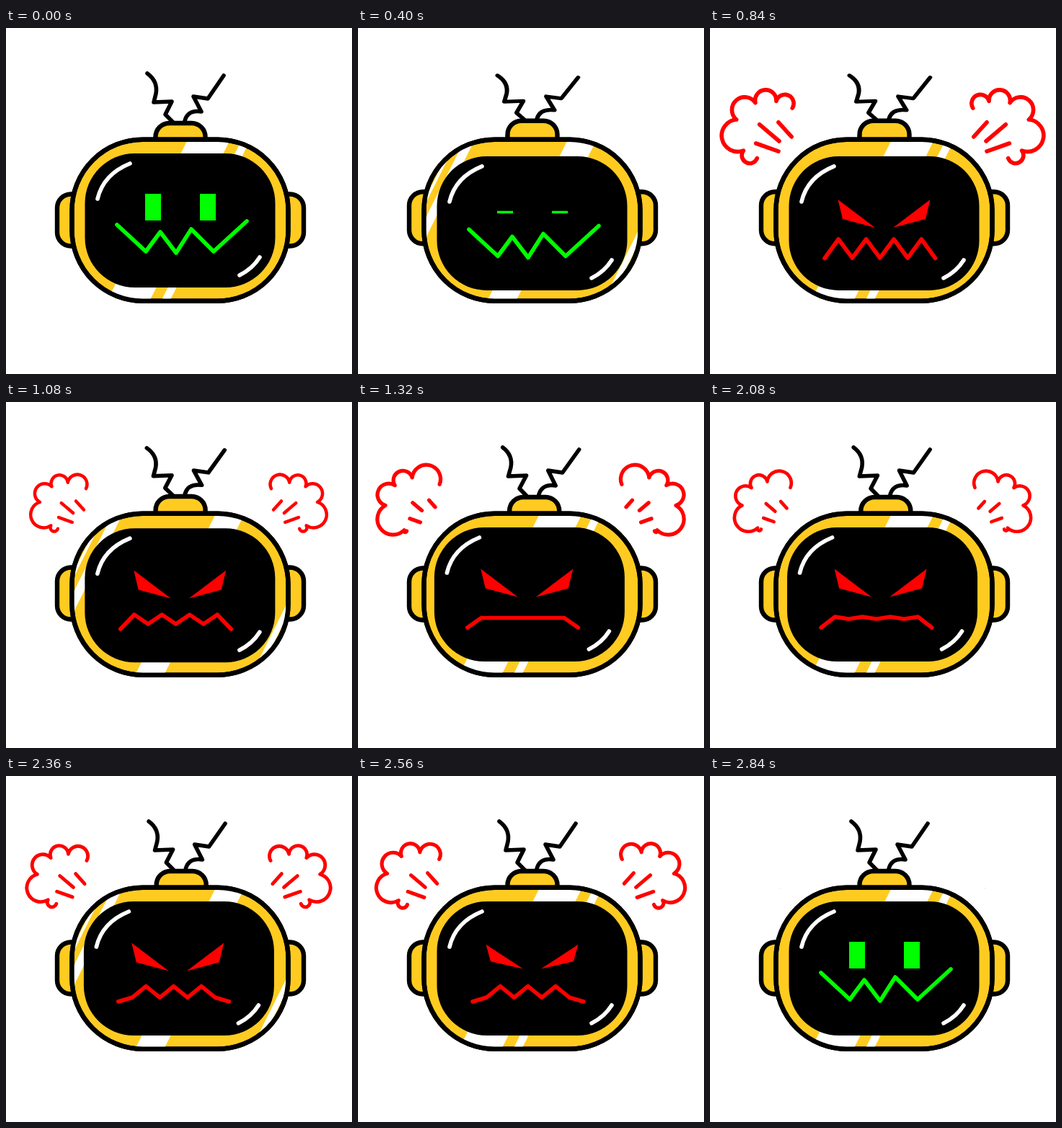
Recreate the animation shown at these times as an HTML page. Size 480 by 480 pixels, loop 2.88 s.

```html
<!DOCTYPE html>
<html lang="en">
<head>
<meta charset="utf-8">
<title>Angry robot</title>
<style>
html, body { margin: 0; width: 100%; height: 100%; overflow: hidden; background: #fff; }
svg { display: block; width: 100%; height: 100%; }
.body { fill: #ffcb21; stroke: #000; stroke-width: 6.4; }
.line { fill: none; stroke-width: 5.6; stroke-linecap: round; stroke-linejoin: round; }
</style>
</head>
<body>
<svg viewBox="0 0 480 480">
  <defs>
    <rect id="head" x="91.500" y="154.700" width="300" height="224" rx="98"/>
    <clipPath id="ring"><use href="#head"/></clipPath>
    <path id="eye" d="M177.500 231.500L229 270.500L184 258.500Z"/>
    <g id="cloud" class="line" stroke="#f00">
      <path id="outline"/>
      <path id="streaks"/>
    </g>
  </defs>
  <g id="puffL"><use href="#cloud"/></g>
  <g id="puffR"><use href="#cloud"/></g>
  <g id="ears" class="body">
    <rect x="71" y="230.500" width="50" height="72" rx="19"/>
    <rect x="363" y="230.500" width="50" height="72" rx="19"/>
  </g>
  <rect id="bump" class="body" x="207.500" y="132" width="69" height="44" rx="19"/>
  <g id="antenna" class="line" stroke="#000">
    <path d="M196 63Q211 74 208 91L205 103L230 102L221 120L231 130"/>
    <path d="M302 66L280 98L260 95L271 116Q252 113 248 129"/>
  </g>
  <use href="#head" class="body"/>
  <path id="glint" fill="#fff" clip-path="url(#ring)"/>
  <use href="#head" class="body" style="fill: none"/>
  <g id="screen">
    <rect x="109.500" y="174" width="264" height="186" rx="69"/>
    <path class="line" stroke="#fff" d="M127 237Q135 203 172 188M324 343Q342 334 352 318"/>
  </g>
  <g id="face">
    <g id="calm">
      <path class="eyes" fill="#0f0" d="M193 230h22v37h-22zM269 230h22v37h-22z"/>
      <path class="line" stroke="#0f0" d="M154 273L194 310L214 283L236 312L257 279L288 310L334 268"/>
    </g>
    <g id="angry">
      <g class="eyes" fill="#f00">
        <use href="#eye"/>
        <use href="#eye" transform="translate(483 0) scale(-1 1)"/>
      </g>
      <path id="growl" class="line" stroke="#f00"/>
    </g>
  </g>
</svg>
<script>
const LOOP = 2880, STEP = 40;
const GLINT_HOLD = 2840 / 14;
const TAU = 2 * Math.PI;
const $ = id => document.getElementById(id);
const set = (id, name, value) => $(id).setAttribute(name, value);
const mix = (a, b, p) => a + (b - a) * p;
const clamp = p => Math.min(1, Math.max(0, p));
const span = (t, a, b) => clamp((t - a) / (b - a));
const smooth = p => (1 - Math.cos(Math.PI * p)) / 2;
const ramp = (t, a, b) => smooth(span(t, a, b));
const backOut = (p, c) => 1 + (c + 1) * (p - 1) ** 3 + c * (p - 1) ** 2;
const blink = (t, mid) => smooth(clamp(1 - Math.abs(t - mid) / 120));

// Nod while angry starts, then shake the head.
const nod = t => 6.5 * (ramp(t, 0, 360) - ramp(t, 880, 1200));
const shake = t => t > 1075 && t < 2425 ? -7.3 * Math.cos(TAU * (t - 1300) / 900) : 0;

// Height of the mouth's teeth; below zero they point the other way.
const teeth = t => 13 * (1 - ramp(t, 840, 1320) + ramp(t, 1320, 1760) - 1.6 * ramp(t, 1760, 2360));

// Clouds pop out, breathe and shrink away.
const puff = t => backOut(span(t, 560, 960), 3)
  * (.86 + .08 * Math.cos(TAU * (t - 700) / 600))
  * (1 - span(t, 2540, 2843) ** 1.6);

function growlPath(a) {
  const points = Array.from({ length: 9 }, (_, i) => {
    const end = i % 8 === 0;
    return `${159 + 19.2 * i} ${end ? 313 : 299.5 + (i % 2 ? -a : a)}`;
  });
  return "M" + points.join("L");
}

// Round puffs between joints on an ellipse; the joints roll along it.
function cloudPath(roll) {
  const joints = [48, 78, 113, 159, 223, 250].map((deg, i) => {
    const turn = -Math.min(250, i % 5 ? deg + roll : deg) * TAU / 360;
    return [82 + 48 * Math.cos(turn), 142 + 41 * Math.sin(turn)];
  });
  return joints.map(([x, y], i) => {
    if (!i) return `M${x} ${y}`;
    const r = .505 * Math.hypot(x - joints[i - 1][0], y - joints[i - 1][1]);
    return `A${r} ${r} 0 1 0 ${x} ${y}`;
  }).join("");
}

function streakPath(from, to) {
  return [[95, 131, 18, 20], [69, 134, 27, 23], [64, 160, 31, 11]].map(([x, y, dx, dy]) =>
    `M${x + dx * from} ${y + dy * from}L${x + dx * to} ${y + dy * to}`).join("");
}

// Slanted bands, given as left edge and width at y = 165.
const glints = [
  [[247, 59], [322, 12]],
  [[129, 4], [143, 14], [286, 40], [447, 9]]
].map(bands => bands.map(([x, w]) => `M${x + 10} 145h${w}l-125 250h${-w}Z`).join(""));

function draw(t) {
  const x = shake(t), y = nod(t);
  set("face", "transform", `translate(${x} ${y})`);
  set("screen", "transform", `translate(${x * .5} ${y * .6})`);

  // Parts behind the head move the opposite way.
  const bx = -x * .37, by = -y * .5;
  set("ears", "transform", `translate(0 ${by})`);
  set("bump", "transform", `translate(${bx} ${by})`);
  set("antenna", "transform",
    `translate(${242 + bx} ${130 + by}) matrix(1 0 ${x * .0043} 1 0 0) ` +
    `scale(${1 + y * .0085} ${1 - y * .014}) translate(-242 -130)`);

  const mad = t > 410 && t < 2650;
  set("calm", "display", mad ? "none" : "inline");
  set("angry", "display", mad ? "inline" : "none");
  const lid = 1 - .92 * (blink(t, 410) + blink(t, 2650));
  for (const eyes of document.querySelectorAll(".eyes"))
    eyes.setAttribute("transform", `translate(0 ${249 * (1 - lid)}) scale(1 ${lid})`);

  const a = teeth(t), rage = Math.abs(a) / 13;
  set("growl", "d", growlPath(a));
  set("outline", "d", cloudPath(22 * (1 - rage)));
  set("streaks", "d", streakPath(mix(.2, 0, rage), mix(.7, 1, rage)));
  const s = puff(t);
  for (const [id, cx, dir] of [["puffL", 98, 1], ["puffR", 381, -1]]) {
    set(id, "display", s > 0 ? "inline" : "none");
    set(id, "transform", `translate(${cx} 156) scale(${s * dir} ${s}) translate(-98 -156)`);
  }

  set("glint", "d", glints[Math.floor(t / GLINT_HOLD) % 2]);
}

const start = performance.now();
function tick() {
  const t = Math.max(0, performance.now() - start) % LOOP;
  draw(t - t % STEP);
  requestAnimationFrame(tick);
}
tick();
</script>
</body>
</html>
```
